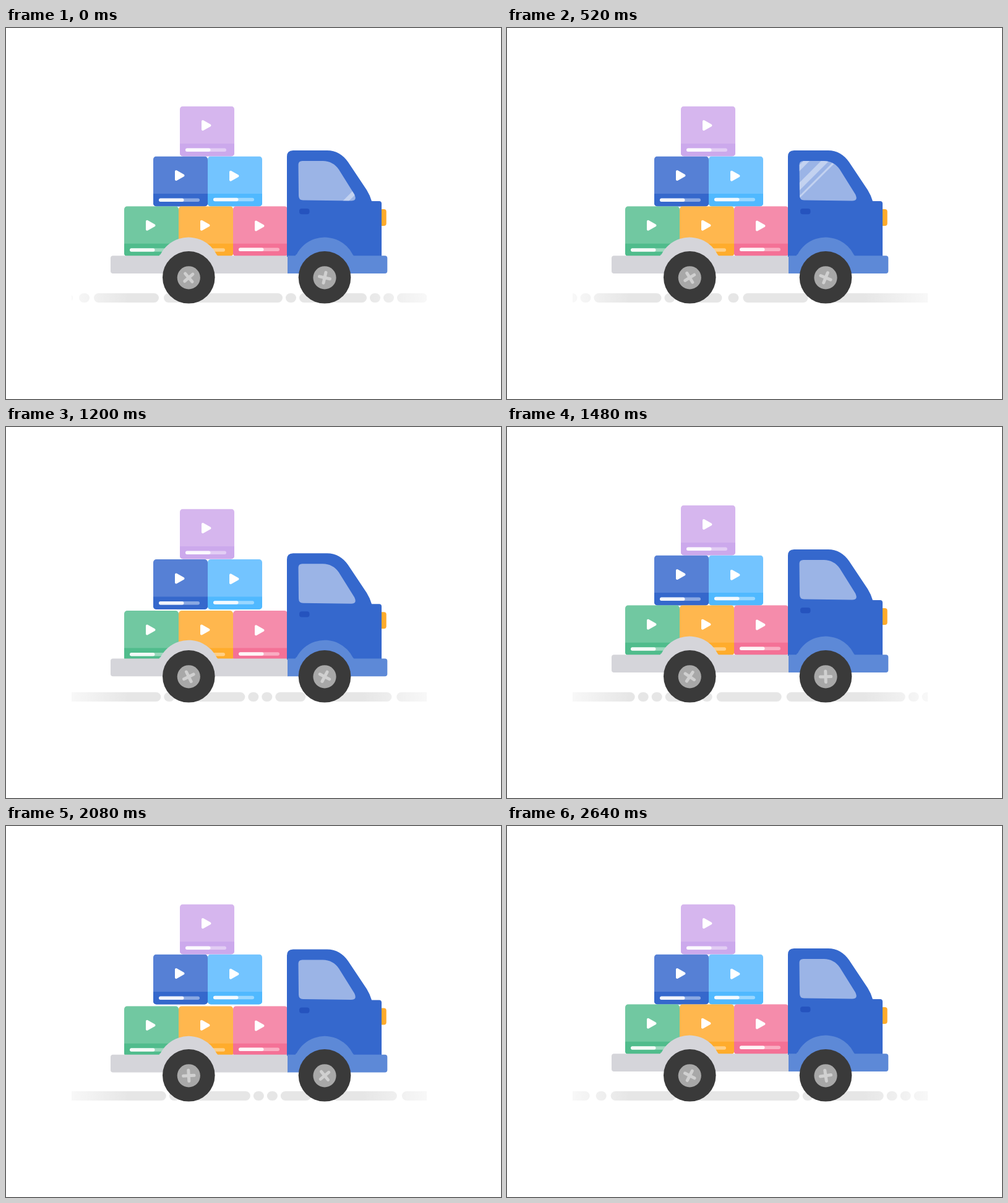
An HTML page with a canvas that plays this animation: 800 px wide and 600 px high, repeating every 2.68 s.

```html
<!DOCTYPE html>
<html lang="en">
<head>
<meta charset="utf-8">
<title>Delivery truck</title>
<style>
  html, body { margin: 0; width: 100%; height: 100%; overflow: hidden; background: #fff; }
  canvas { display: block; }
</style>
</head>
<body>
<canvas id="stage" width="800" height="600"></canvas>
<script>
const ctx = document.getElementById('stage').getContext('2d');

const LOOP = 2680;
const STEP = 40;
const BUMP_PERIOD = 980;
const ROAD = { left: 106, right: 680, top: 429, height: 15, period: 573, laps: 3 };
const WHEEL_TURNS = 4;

// [x, width] of each dash within one road period
const DASHES = [[118, 17], [142, 105], [255, 192], [452, 17], [474, 109], [588, 17], [610, 17], [632, 49]];

const BUMPS = {
  truck:  { start: 60,  peak: 265, end: 445, depth: 7 },
  bottom: { start: 20,  peak: 305, end: 500, depth: 11 },
  middle: { start: 110, peak: 300, end: 480, depth: 10.4 },
  top:    { start: 121, peak: 285, end: 440, depth: 9.1 }
};

const BOXES = [
  { x: 281, y: 126.5, row: 'top', face: '#d6b6ee', strip: '#cca9ec' },
  { x: 238, y: 207.5, row: 'middle', face: '#5680d5', strip: '#3568cc' },
  { x: 326, y: 207.5, row: 'middle', face: '#73c4ff', strip: '#50b9ff', nudge: 0.7 },
  { x: 191, y: 288.2, row: 'bottom', face: '#71c8a1', strip: '#50bc8c' },
  { x: 279, y: 288.2, row: 'bottom', face: '#ffb74e', strip: '#ffac2c' },
  { x: 367, y: 288.2, row: 'bottom', face: '#f58cab', strip: '#f47196', nudge: 0.7 }
];

function roundRect(x, y, w, h, radius, fill) {
  ctx.fillStyle = fill;
  ctx.beginPath();
  ctx.roundRect(x, y, w, h, radius);
  ctx.fill();
}

function disc(x, y, r, fill) {
  ctx.fillStyle = fill;
  ctx.beginPath();
  ctx.arc(x, y, r, 0, Math.PI * 2);
  ctx.fill();
}

function shifted(x, y, draw) {
  ctx.save();
  ctx.translate(x, y);
  draw();
  ctx.restore();
}

// Dips smoothly down to its depth and back to rest
function dip(time, { start, peak, end, depth }) {
  const phase = time % BUMP_PERIOD;
  if (phase <= start || phase >= end) return 0;
  const span = phase < peak ? peak - start : end - peak;
  return depth * Math.cos((phase - peak) / span * Math.PI / 2) ** 2;
}

function drawRoad(time) {
  const fade = ctx.createLinearGradient(ROAD.left, 0, ROAD.right, 0);
  fade.addColorStop(0, '#f8f8f8');
  fade.addColorStop(0.16, '#e6e6e6');
  fade.addColorStop(0.82, '#e6e6e6');
  fade.addColorStop(1, '#f8f8f8');
  const travel = ROAD.period * ((ROAD.laps * time / LOOP) % 1);
  ctx.save();
  ctx.beginPath();
  ctx.rect(ROAD.left, ROAD.top - 1, ROAD.right - ROAD.left, ROAD.height + 2);
  ctx.clip();
  for (let copy = -1; copy <= 1; copy++) {
    for (const [x, width] of DASHES) {
      roundRect(x - travel + copy * ROAD.period, ROAD.top, width, ROAD.height, 7.5, fade);
    }
  }
  ctx.restore();
}

function drawBox({ face, strip, nudge = 0 }) {
  ctx.save();
  ctx.beginPath();
  ctx.roundRect(0, 0, 88, 81, 5);
  ctx.clip();
  ctx.fillStyle = face;
  ctx.fillRect(0, 0, 88, 81);
  ctx.fillStyle = strip;
  ctx.fillRect(0, 60.5, 88, 21);
  ctx.restore();

  roundRect(9, 68 - nudge, 66, 5.5, 2.75, 'rgba(255,255,255,.42)');
  roundRect(9, 68 - nudge, 40.5, 5.5, 2.75, 'rgba(255,255,255,.88)');

  ctx.fillStyle = ctx.strokeStyle = '#fff';
  ctx.lineWidth = 4;
  ctx.lineJoin = 'round';
  ctx.beginPath();
  ctx.moveTo(37, 24.5 + nudge);
  ctx.lineTo(48.5, 31 + nudge);
  ctx.lineTo(37, 37.5 + nudge);
  ctx.closePath();
  ctx.fill();
  ctx.stroke();
}

function cabPath() {
  ctx.beginPath();
  ctx.moveTo(454, 370);
  ctx.lineTo(454, 208);
  ctx.quadraticCurveTo(454, 198, 464, 198);
  ctx.lineTo(519, 198);
  ctx.bezierCurveTo(533, 198, 545, 205, 553, 217);
  ctx.lineTo(583, 262);
  ctx.quadraticCurveTo(588, 270, 591, 280);
  ctx.lineTo(603, 280);
  ctx.quadraticCurveTo(607, 280, 607, 284);
  ctx.lineTo(607, 370);
  ctx.closePath();
}

function windowPath() {
  ctx.beginPath();
  ctx.moveTo(472.5, 221);
  ctx.quadraticCurveTo(472.5, 215, 479, 215);
  ctx.lineTo(512, 215);
  ctx.bezierCurveTo(523, 215, 532, 220, 538, 229);
  ctx.lineTo(563, 269);
  ctx.quadraticCurveTo(568, 279.5, 558, 279.5);
  ctx.lineTo(480, 278.5);
  ctx.quadraticCurveTo(473, 278.5, 473, 271);
  ctx.closePath();
}

// Diagonal reflections sweeping leftwards across the glass
function drawShine(time) {
  ctx.save();
  windowPath();
  ctx.clip();
  ctx.strokeStyle = 'rgba(255,255,255,.4)';
  for (const [offset, width] of [[829, 7], [859, 9], [876, 3]]) {
    const sum = offset - time * 0.25;
    ctx.lineWidth = width;
    ctx.beginPath();
    ctx.moveTo(sum - 300, 300);
    ctx.lineTo(sum - 200, 200);
    ctx.stroke();
  }
  ctx.restore();
}

function drawArch(x, fill) {
  ctx.fillStyle = fill;
  ctx.beginPath();
  ctx.moveTo(x - 51, 372);
  ctx.quadraticCurveTo(x - 48, 370, x - 46, 366);
  ctx.arc(x, 389.5, 51, Math.PI + 0.47, -0.47);
  ctx.quadraticCurveTo(x + 48, 370, x + 51, 372);
  ctx.closePath();
  ctx.fill();
}

function drawTruck(time) {
  const grey = '#d5d5da';
  const paleBlue = '#5d89d7';

  roundRect(169, 368.3, 287, 28.7, [4, 0, 0, 4], grey);
  drawArch(295, grey);

  roundRect(604, 293, 10.7, 27, 4, '#ffab2c');
  cabPath();
  ctx.fillStyle = '#3568cd';
  ctx.fill();
  windowPath();
  ctx.fillStyle = '#9bb4e6';
  ctx.fill();
  drawShine(time);
  roundRect(474, 292, 16.5, 9.3, 4, '#2553be');

  roundRect(455, 368.3, 161.3, 28.7, [0, 4, 4, 0], paleBlue);
  drawArch(515, paleBlue);
}

function drawWheel(x, startDegrees, time) {
  disc(x, 403.3, 42.3, '#3a3a3a');
  shifted(x, 403.8, () => {
    disc(0, 0, 18.6, '#a8a8a8');
    ctx.rotate(startDegrees * Math.PI / 180 + WHEEL_TURNS * Math.PI * 2 * time / LOOP);
    ctx.strokeStyle = '#d0d0d0';
    ctx.lineWidth = 5;
    ctx.lineCap = 'round';
    ctx.beginPath();
    ctx.moveTo(-8.7, 0);
    ctx.lineTo(8.7, 0);
    ctx.moveTo(0, -8.7);
    ctx.lineTo(0, 8.7);
    ctx.stroke();
  });
}

function draw(time) {
  ctx.fillStyle = '#fff';
  ctx.fillRect(0, 0, 800, 600);
  drawRoad(time);
  for (const box of BOXES) {
    shifted(box.x, box.y + dip(time, BUMPS[box.row]), () => drawBox(box));
  }
  shifted(0, dip(time, BUMPS.truck), () => drawTruck(time));
  drawWheel(295.3, 49, time);
  drawWheel(515, 13, time);
}

const startTime = performance.now();

function tick() {
  const elapsed = (performance.now() - startTime) % LOOP;
  draw(Math.floor(elapsed / STEP) * STEP);
  requestAnimationFrame(tick);
}

tick();
</script>
</body>
</html>
```
